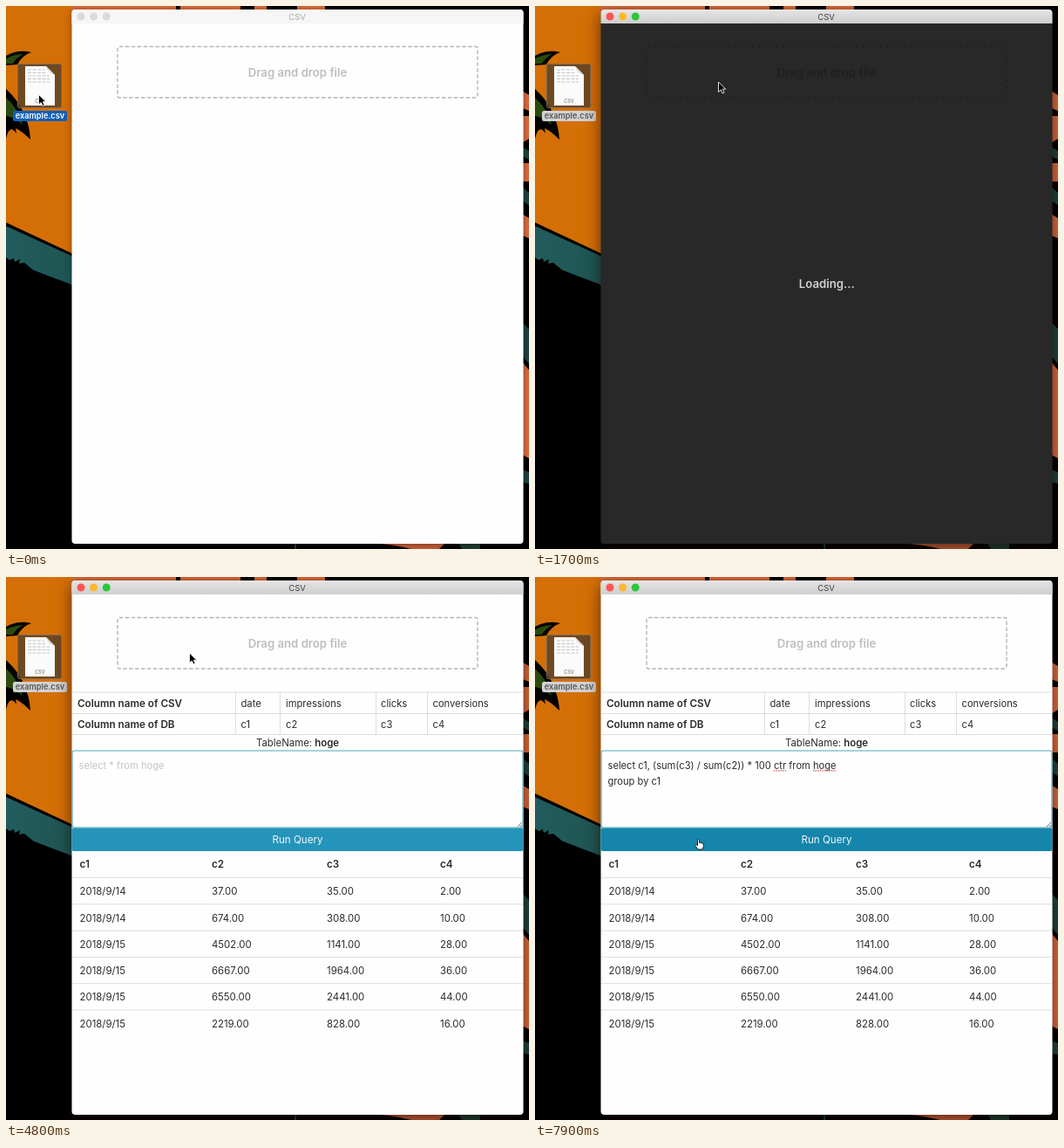
An HTML page that plays this animation: 600x622 px, repeating every 8000 ms.

```html
<!DOCTYPE html>
<html lang="en">
<head>
<meta charset="utf-8">
<title>CSV query</title>
<style>
html, body { margin: 0; width: 100%; height: 100%; overflow: hidden; background: #000; }
svg { display: block; width: 600px; height: 622px; }
text { font: 11.4px Inter, Roboto, sans-serif; fill: #2b2b2b; white-space: pre; }
.bold { font-weight: 600; }
.mid { text-anchor: middle; }
.window { filter: drop-shadow(0 5px 9px rgba(20, 0, 0, .6)); }
.rule { stroke: #dedede; fill: none; }
.squiggle { stroke: #d0524a; stroke-width: 1.3; stroke-dasharray: 1.5 1.1; }
</style>
</head>
<body>
<svg viewBox="0 0 600 622">
  <defs>
    <linearGradient id="bar" x2="0" y2="1">
      <stop stop-color="#e6e5e6"/><stop offset="1" stop-color="#cfcecf"/>
    </linearGradient>
    <linearGradient id="hill">
      <stop stop-color="#235c5e"/><stop offset="1" stop-color="#1d5450"/>
    </linearGradient>
    <g id="doc">
      <path d="M22 69H46L56 79V114H22Z" fill="#fbfbfb"/>
      <path d="M46 69Q48 77 56 79Z" fill="#dedede"/>
      <path d="M25 73H44M25 76.5H45M25 80H50M25 83.500H50M25 87H50" stroke="#c4c4c4" stroke-dasharray="4 1.5"/>
      <text x="39" y="110.500" class="mid bold" style="font-size:5.5px;fill:#8c8c8c">CSV</text>
    </g>
  </defs>

  <g id="wallpaper">
    <path d="M0 0H600V622H0Z"/>
    <path d="M0 0H90V290L0 248Z" fill="#d46f06"/>
    <path d="M0 252L90 293V326L0 290Z" fill="url(#hill)"/>
    <path d="M0 288L4 291L9 289L10 293L16 290L15 295L21 294L32 303L75 319V340H0Z"/>
    <path d="M0 57Q14 49 29 53Q19 56 13 67L0 68Z"/>
    <path d="M0 60Q11 55 20 55Q12 59 8 66L0 66Z" fill="#2a4a10"/>
    <path d="M0 95Q14 108 20 122Q27 136 28 153Q18 143 11 140L12 146Q4 134 0 152Z"/>
    <path d="M0 105Q13 116 19 136Q9 127 0 126Z" fill="#2a4a10"/>
    <path d="M75 0H195V6H75ZM200 0H269V6H200ZM285 0H299V6H285ZM334 0H366V6H334Z" fill="#d86a38"/>
    <path d="M428 614H505L497 622H465Q445 617 428 616Z" fill="#c8623a"/>
    <path d="M331 614H333V622H331ZM518 614H544V622H523Z" fill="#1c4030"/>
    <g fill="#dc6c3c">
      <path d="M590 96L600 102V120L590 116ZM590 126H600V152L590 158Z"/>
      <path d="M590 180H600V201H590ZM590 237L600 243V266L590 262ZM590 405L600 417V518L590 513Z"/>
    </g>
    <path d="M590 160L600 166V176L590 171ZM590 205L600 214V228L590 222ZM590 360L600 370V410L590 398ZM590 530L600 534V547L590 545Z" fill="#1c4440"/>
  </g>

  <rect x="13.500" y="66.500" width="50" height="50" rx="2" fill="#54402a" fill-opacity=".8" stroke="#7d6850"/>
  <use href="#doc"/>
  <rect id="label" x="8" y="120" width="62" height="12" rx="2.500"/>
  <text id="labelText" x="39" y="129.300" class="mid bold" style="font-size:9.2px">example.csv</text>

  <g id="shell" class="window">
    <rect id="body" x="75.500" y="4" width="518" height="612" rx="4"/>
  </g>
  <path id="titleBar" d="M75.500 20V8Q75.500 4 79.500 4H589.500Q593.500 4 593.500 8V20Z"/>
  <g id="lights"></g>
  <text id="title" x="334" y="15.600" class="mid" style="font-size:9.500px">CSV</text>

  <rect id="drop" x="128" y="46.500" width="413" height="58.500" rx="2" fill="none" stroke-width="1.400" stroke-dasharray="4.500 2.400"/>
  <text id="dropText" x="334.500" y="80.600" class="mid bold" style="font-size:13.2px">Drag and drop file</text>
  <text id="loading" x="334.700" y="323" class="mid bold" style="font-size:13.2px;fill:#d2d2d2">Loading...</text>

  <g id="results">
    <g id="tables"></g>
    <rect x="76" y="199" width="517" height="88" rx="2" fill="#fefefe" stroke="#55a8b8" stroke-width="1.200"/>
    <path d="M587 286L592 281M590 286L592 284" stroke="#7c7c7c"/>
    <text id="hint" x="83.500" y="220" style="font-size:11.2px;fill:#c4c4c4">select * from hoge</text>
    <text id="line0" x="83.500" y="220" style="font-size:11.15px"></text>
    <text id="line1" x="83.500" y="238" style="font-size:11.15px"></text>
    <path id="squiggles" class="squiggle"/>
    <path id="caret" stroke="#222"/>
    <rect id="button" x="75.500" y="287.500" width="518" height="26.500" rx="2.500"/>
    <text x="334.500" y="305" class="mid" style="font-size:11.6px;fill:#f4f8fa">Run Query</text>
  </g>

  <g id="ghost" opacity=".6">
    <use href="#doc"/>
    <rect x="8" y="120" width="62" height="12" rx="2.500" fill="#125fb8"/>
    <text x="39" y="129.300" class="mid bold" style="font-size:9.2px;fill:#fff">example.csv</text>
  </g>

  <path id="arrow" d="M0 0V11.500L2.700 9L4.600 13L6.600 12.100L4.800 8.200H8.200Z" fill="#000" stroke="#f8f8f8" stroke-width=".9"/>
  <path id="beam" d="M-2.500 -5.500Q0 -5.500 0 -4V4Q0 5.500 -2.500 5.500M2.500 -5.500Q0 -5.500 0 -4M0 4Q0 5.500 2.500 5.500" fill="none" stroke="#222" stroke-width="1.100"/>
  <path id="hand" d="M-2 0V-5Q-1 -7 0 -5V-1.500L1.500 -2L3 -1L4.800 -.5V3L3.500 6H-1.500L-4.800 1.500Q-4.500 -.5 -2 1.500Z" fill="#fff" stroke="#111" stroke-width=".9"/>
</svg>

<script>
const $ = id => document.getElementById(id);
const set = (id, attrs) => { for (const k in attrs) $(id).setAttribute(k, attrs[k]); };
const show = (id, on) => { $(id).style.display = on ? '' : 'none'; };
const color = (id, value) => { $(id).style.fill = value; };
const clamp = v => Math.max(0, Math.min(1, v));
const ease = v => v * v * (3 - 2 * v);
const span = (t, from, to) => clamp((t - from) / (to - from));
const mix = (a, b, k) => a.map((v, i) => v + (b[i] - v) * k);

const LOOP = 8000;
const ACTIVE = 1500, DROPPED = 1500, LOADING = 1700, LOADED = 4800;
const TYPE_START = 5500, TYPE_END = 6900;
const ICON = [37.5, 101.5], DROP = [210.5, 87], EDIT = [186, 251], RUN = [188.5, 306];
const QUERY = ['select c1, (sum(c3) / sum(c2)) * 100 ctr from hoge', 'group by c1'];
const MISSPELT = ['ctr', 'hoge'];

const label = (x, y, str, cls = '', size = 11.4) =>
  `<text x="${x}" y="${y}" class="${cls}" style="font-size:${size}px">${str}</text>`;

function buildTables() {
  const names = ['date', 'impressions', 'clicks', 'conversions'];
  const rows = [
    ['2018/9/14', 37, 35, 2], ['2018/9/14', 674, 308, 10], ['2018/9/15', 4502, 1141, 28],
    ['2018/9/15', 6667, 1964, 36], ['2018/9/15', 6550, 2441, 44], ['2018/9/15', 2219, 828, 16]
  ];
  const colX = [84.5, 236, 368, 498];
  let out = label(82, 148.6, 'Column name of CSV', 'bold', 11.7) +
            label(82, 173, 'Column name of DB', 'bold', 11.7);
  [269.5, 321, 430, 489.5].forEach((x, i) => {
    out += label(x, 148.6, names[i], '', 11.2) + label(x, 173, 'c' + (i + 1), '', 11.2);
    out += label(colX[i], 333.3, 'c' + (i + 1), 'bold', 11.7);
  });
  rows.forEach((row, r) => row.forEach((v, i) => {
    out += label(colX[i], 364.3 + r * 30.25, i ? v.toFixed(2) : v);
  }));
  out += '<text x="334.5" y="194" class="mid">TableName: <tspan class="bold">hoge</tspan></text>';
  let d = 'M76 132H593M76 156.500H593M76 180.500H593';
  for (const x of [263.5, 314.5, 424.5, 483.5]) d += `M${x} 132V180.500`;
  for (let r = 0; r < 6; r++) d += `M76 ${344.5 + r * 30.3}H593`;
  $('tables').innerHTML = `<path class="rule" d="${d}"/>` + out;
}

function drawLights(active) {
  const colors = active ? ['#fc5650', '#fdb82c', '#2ac63c'] : Array(3).fill('#dadada');
  $('lights').innerHTML = colors.map((c, i) =>
    `<circle cx="${86 + i * 14.6}" cy="12" r="4.500" fill="${c}"/>`).join('');
}

function drawWindow(t) {
  const active = t >= ACTIVE, busy = t >= LOADING && t < LOADED;
  drawLights(active);
  set('titleBar', { fill: active ? 'url(#bar)' : '#f6f6f6' });
  color('title', active ? '#404040' : '#aaa');
  $('shell').style.filter = active ? '' : 'drop-shadow(0 2px 4px rgba(20,0,0,.4))';
  set('body', { fill: busy ? '#282828' : '#fefefe' });
  set('drop', {
    stroke: busy ? '#1f1f1f' : '#b4b4b4',
    'stroke-dasharray': busy ? '2 5' : '4.500 2.400'
  });
  color('dropText', busy ? '#1f1f1f' : '#bebebe');
  show('loading', busy);
  show('results', t >= LOADED);
  color('label', t < LOADING ? '#125fb8' : '#d2d2d2');
  color('labelText', t < LOADING ? '#fff' : '#555');
}

function drawEditor(t) {
  const total = QUERY[0].length + QUERY[1].length;
  const count = Math.floor(span(t, TYPE_START, TYPE_END) * total);
  const first = QUERY[0].slice(0, count);
  const second = QUERY[1].slice(0, Math.max(0, count - QUERY[0].length));
  $('line0').textContent = first;
  $('line1').textContent = second;
  show('hint', !count);

  let d = '';
  for (const word of MISSPELT) {
    const at = QUERY[0].indexOf(word), end = at + word.length;
    if (first.length < end) continue;
    const x = $('line0').getStartPositionOfChar(at).x;
    const w = $('line0').getSubStringLength(at, word.length);
    d += `M${x} 221.800h${w}`;
  }
  set('squiggles', { d });

  const row = second ? 1 : 0;
  const x = 84 + (count ? $('line' + row).getComputedTextLength() : 0);
  set('caret', { d: `M${x} ${210 + row * 18}v13` });
  show('caret', t >= 5400 && t < 7400);
}

function drawPointer(t) {
  let pos = mix(ICON, DROP, ease(span(t, 100, 1400)));
  if (t >= LOADED) pos = mix(DROP, EDIT, ease(span(t, 4900, 5300)));
  if (t >= 7400) pos = mix(EDIT, RUN, ease(span(t, 7400, 7800)));
  const kind = t < LOADED || pos[1] < 199 ? 'arrow' : pos[1] < 287 ? 'beam' : 'hand';
  for (const id of ['arrow', 'beam', 'hand']) show(id, id === kind);
  set(kind, { transform: `translate(${pos})` });
  set('button', { fill: kind === 'hand' ? '#1585ab' : '#2594ba' });
  show('ghost', t >= 100 && t < DROPPED);
  set('ghost', { transform: `translate(${pos[0] - ICON[0]} ${pos[1] - ICON[1]})` });
}

function draw(t) {
  drawWindow(t);
  if (t >= LOADED) drawEditor(t);
  drawPointer(t);
}

buildTables();
const start = performance.now();
function tick() {
  draw((performance.now() - start) % LOOP);
  requestAnimationFrame(tick);
}
draw(0);
requestAnimationFrame(tick);
</script>
</body>
</html>
```
